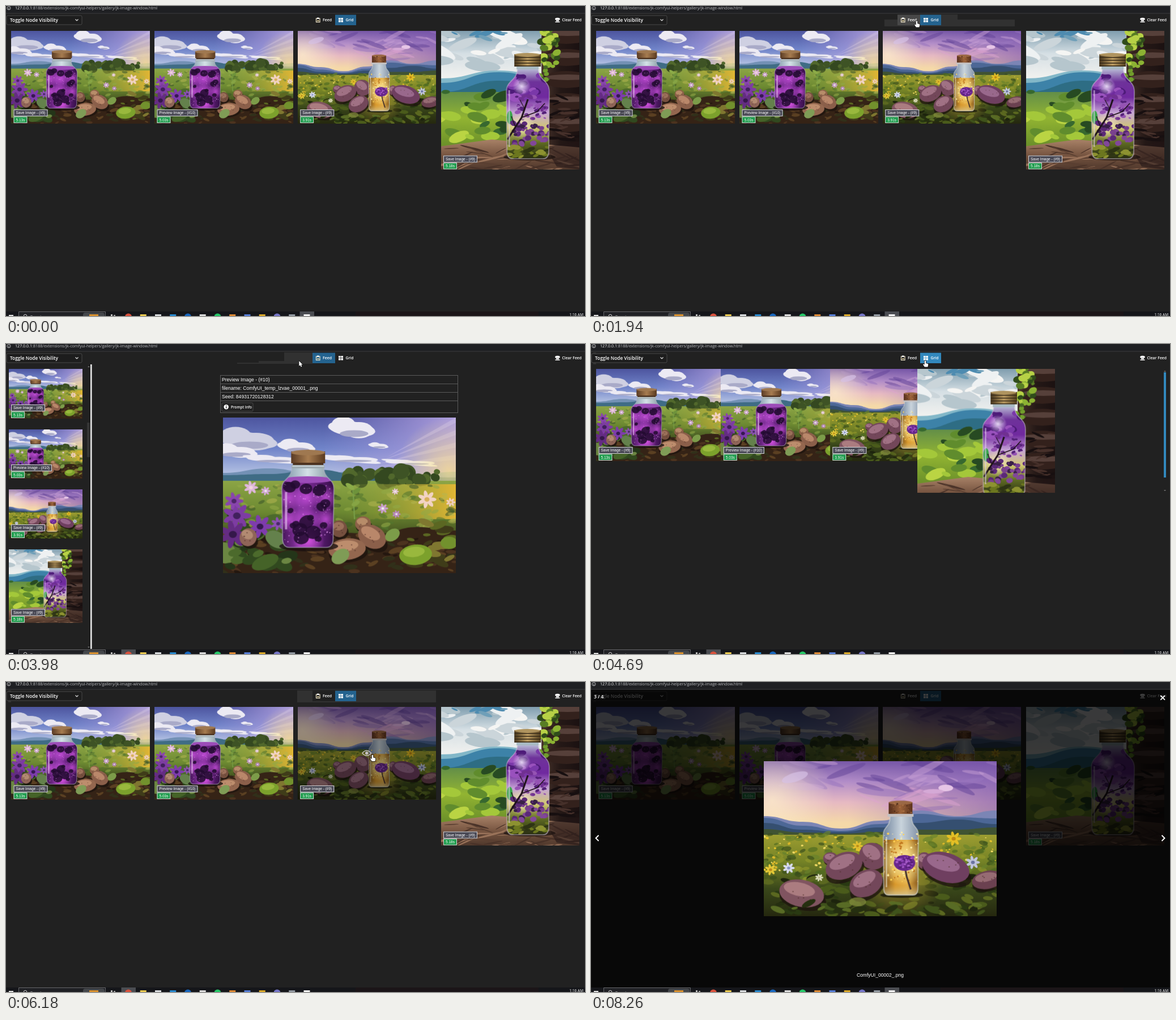
Recreate the animation shown at these times as an HTML page with a canvas. Size 1022x548 px, loop 8.35 s.

```html
<!DOCTYPE html>
<html lang="en">
<head>
<meta charset="utf-8">
<title>Image gallery</title>
<style>
html, body { margin: 0; width: 100%; height: 100%; overflow: hidden; background: #212121; }
canvas { display: block; }
</style>
</head>
<body>
<canvas id="stage" width="1022" height="548"></canvas>
<script>
const LOOP = 8350;
const screen2d = document.getElementById('stage').getContext('2d');
let c = screen2d;
const SANS = '"Open Sans", sans-serif', ARIAL = '"Liberation Sans", Arial, sans-serif';
const BG = '#212121', BLUE = '#24638f', BRIGHT = '#3288bd';

// Drawing helpers
const clamp = v => Math.max(0, Math.min(1, v));
const mix = (a, b, k) => a + (b - a) * k;
const easeOut = p => 1 - (1 - clamp(p)) ** 3;

function rect(x, y, w, h, fill) { c.fillStyle = fill; c.fillRect(x, y, w, h); }
function frame(x, y, w, h, color, lw = 1) { c.strokeStyle = color; c.lineWidth = lw; c.strokeRect(x, y, w, h); }
function ell(x, y, rx, ry, fill, rot = 0) {
  c.fillStyle = fill;
  c.beginPath(); c.ellipse(x, y, rx, ry, rot, 0, 7); c.fill();
}
function line(color, lw, ...p) {
  c.strokeStyle = color; c.lineWidth = lw;
  c.beginPath();
  for (let i = 0; i < p.length; i += 2) c.lineTo(p[i], p[i + 1]);
  c.stroke();
}
function poly(fill, ...p) {
  c.fillStyle = fill;
  c.beginPath();
  for (let i = 0; i < p.length; i += 2) c.lineTo(p[i], p[i + 1]);
  c.fill();
}
function text(s, x, y, size, color = '#fff', font = SANS, weight = 400, align = 'left') {
  c.font = `${weight} ${size}px ${font}`;
  c.fillStyle = color; c.textAlign = align; c.textBaseline = 'alphabetic';
  c.fillText(s, x, y);
  return c.measureText(s).width;
}
function grad(x0, y0, x1, y1, ...colors) {
  const g = c.createLinearGradient(x0, y0, x1, y1);
  colors.forEach((col, i) => g.addColorStop(i / (colors.length - 1), col));
  return g;
}
function glow(x, y, r, color) {
  const g = c.createRadialGradient(x, y, 0, x, y, r);
  g.addColorStop(0, color); g.addColorStop(1, color.slice(0, 7) + '00');
  ell(x, y, r, r, g);
}

let seed = 1;
const rnd = () => (seed = seed * 16807 % 2147483647) / 2147483647;
function scatter(n, x, y, w, h, rx, ry, ...colors) {
  for (let i = 0; i < n; i++) {
    const k = 0.4 + rnd() * 0.8;
    ell(x + rnd() * w, y + rnd() * h, rx * k, ry * k, colors[i % colors.length], rnd() - 0.5);
  }
}
function hills(fill, base, ...ys) {
  const step = 412 / (ys.length - 1);
  c.fillStyle = fill;
  c.beginPath(); c.moveTo(0, base); c.lineTo(0, ys[0]);
  for (let i = 1; i < ys.length; i++) {
    const x = i * step, m = x - step / 2;
    c.bezierCurveTo(m, ys[i - 1], m, ys[i], x, ys[i]);
  }
  c.lineTo(412, base); c.fill();
}
function cloud(x, y, w, h, color = '#eceaf3') {
  ell(x, y, w, h * 0.55, color, 0.12);
  ell(x - w * 0.35, y - h * 0.3, w * 0.5, h * 0.6, color);
  ell(x + w * 0.3, y + h * 0.1, w * 0.6, h * 0.6, color);
  ell(x + w * 0.1, y + h * 0.35, w * 0.6, h * 0.25, '#a9aac8');
}
function flower(x, y, r, color, eye) {
  for (let a = 0; a < 6.2; a += 0.9)
    ell(x + Math.cos(a) * r * 0.55, y + Math.sin(a) * r * 0.5, r * 0.5, r * 0.22, color, a);
  ell(x, y, r * 0.28, r * 0.25, eye);
}
function potato(x, y, rx, ry, rot, body, light) {
  ell(x + 2, y + ry * 0.4, rx * 1.05, ry * 0.85, '#1d130ecc', rot);
  ell(x, y, rx, ry, body, rot);
  ell(x - rx * 0.1, y - ry * 0.3, rx * 0.7, ry * 0.5, light, rot);
  for (let i = 0; i < 5; i++) ell(x + (rnd() - 0.5) * rx, y + (rnd() - 0.5) * ry, 1.3, 1, '#4a2a2599');
}
// Symmetric glass outline: neck half-width, body half-width and heights
function glass(cx, neck, body, top, shoulder, bottom) {
  const r = body * 0.3, p = new Path2D();
  p.moveTo(cx - neck, top);
  p.bezierCurveTo(cx - neck, mix(top, shoulder, 0.6), cx - body, mix(top, shoulder, 0.5), cx - body, shoulder);
  p.lineTo(cx - body * 0.97, bottom - r);
  p.quadraticCurveTo(cx - body * 0.95, bottom, cx - body + r, bottom);
  p.lineTo(cx + body - r, bottom);
  p.quadraticCurveTo(cx + body * 0.95, bottom, cx + body * 0.97, bottom - r);
  p.lineTo(cx + body, shoulder);
  p.bezierCurveTo(cx + body, mix(top, shoulder, 0.5), cx + neck, mix(top, shoulder, 0.6), cx + neck, top);
  return p;
}
function inside(path, draw) { c.save(); c.clip(path); draw(); c.restore(); }
function outline(path, color, lw) { c.strokeStyle = color; c.lineWidth = lw; c.stroke(path); }

// Pictures
function picture(w, h, draw) {
  const cv = document.createElement('canvas');
  cv.width = w; cv.height = h;
  c = cv.getContext('2d');
  seed = 77;
  draw();
  c = screen2d;
  return cv;
}

const jarPic = picture(412, 275, () => {
  rect(0, 0, 412, 120, grad(0, 0, 0, 110, '#4d559f', '#7084c9', '#c3cfe8'));
  rect(180, 0, 232, 120, grad(180, 0, 412, 20, '#a090d800', '#b0a0de'));
  for (let i = 0; i < 4; i++) poly('#d0c4ec66', 412, i * 22, 412, i * 22 + 9, 290 - i * 8, 70 + i * 6);
  cloud(228, 20, 42, 24); cloud(42, 40, 55, 26, '#cfd0e2'); cloud(20, 60, 42, 16); cloud(130, 52, 34, 16);
  cloud(275, 50, 18, 7); cloud(85, 74, 50, 9); cloud(225, 74, 55, 8); cloud(330, 80, 50, 6);
  hills('#7391b5', 140, 98, 90, 100, 94, 104, 96);
  hills('#3f6c85', 140, 102, 100, 92, 102, 104, 106);
  glow(400, 95, 95, '#ffe48ac0');
  rect(0, 112, 412, 165, grad(0, 112, 0, 220, '#8ca545', '#6d8a32', '#38431a'));
  scatter(45, 220, 94, 160, 22, 13, 11, '#3e5325', '#51682c', '#344820');
  rect(215, 118, 197, 62, grad(215, 0, 412, 0, '#93a43a00', '#e0b534'));
  scatter(170, 0, 120, 412, 80, 9, 4, '#54762f99', '#91a94699', '#3d592a99', '#b4b55188');
  hills('#352316', 275, 212, 208, 215, 204, 206, 194, 200);
  scatter(120, 0, 208, 412, 67, 11, 4, '#24170f', '#4c331f', '#5b4022', '#31301a');
  scatter(32, 0, 170, 125, 100, 16, 9, '#4c6a2c', '#31491f', '#6b8642', '#243519');
  scatter(20, 310, 185, 100, 80, 15, 6, '#5b6722', '#7f7730', '#3f3c19');

  line('#79a04a', 2, 233, 180, 230, 120);
  ell(225, 122, 9, 4, '#8cac48', 0.6); ell(237, 130, 8, 4, '#6e933b', -0.7); ell(235, 152, 8, 4, '#86a444', -0.5);
  flower(25, 174, 24, '#7d3ca2', '#41205d'); flower(66, 193, 21, '#7e3cad', '#351850');
  flower(20, 148, 16, '#8945ad', '#4d2567'); flower(18, 207, 25, '#642c83', '#35184a');
  flower(98, 188, 12, '#8d50b5', '#4a2968');
  flower(50, 124, 12, '#dfb7dc', '#f0d6dc'); flower(76, 130, 8, '#d5a9d9', '#eee');
  flower(361, 145, 16, '#f2d3c3', '#d7b05b'); flower(403, 150, 8, '#f0cfc0', '#dbb258');
  flower(283, 161, 9, '#caa0cf', '#eee'); flower(307, 171, 7, '#ba87c5', '#eee'); flower(305, 131, 6, '#e8c7d8', '#eee');

  potato(45, 212, 15, 16, 0.4, '#8f6558', '#b28a72');
  potato(206, 197, 14, 15, 0, '#76503f', '#9b705a');
  potato(248, 188, 14, 13, 0, '#8d6149', '#b78c69');
  potato(264, 211, 26, 20, 0.5, '#8b5f4a', '#b9876a');
  potato(220, 233, 33, 19, -0.1, '#94674f', '#bd8d6d');
  ell(95, 216, 21, 14, '#64814c', 0.5); ell(75, 256, 25, 12, '#456328', -0.4);
  ell(208, 246, 17, 12, '#7f9c56', -0.6); ell(300, 208, 14, 10, '#7c9c49', -0.6);
  ell(341, 243, 29, 18, '#7ca12c', -0.1); ell(338, 238, 19, 9, '#99b83d', -0.1);
  ell(400, 222, 15, 11, '#72912d');

  const jar = glass(150.5, 28, 46, 87, 126, 230);
  ell(152, 228, 52, 9, '#170e0ecc');
  inside(jar, () => {
    rect(100, 85, 100, 150, grad(105, 0, 195, 0, '#7790a3', '#d4e1e7', '#7d929a'));
    rect(100, 108, 100, 125, grad(105, 0, 195, 0, '#451558', '#8a35a4', '#64217c', '#370f4a'));
    ell(150, 110, 45, 6, '#9c4cb8');
    for (let i = 0; i < 6; i++) glow(116 + i % 3 * 33, 142 + (i % 2) * 38, 23, '#d454e8c0');
    glow(152, 218, 28, '#e65af0d0');
    scatter(16, 112, 118, 76, 100, 12, 10, '#220b30dd');
    scatter(85, 107, 118, 86, 108, 1, 1, '#f3a8ffaa');
    line('#e8c7f299', 4, 112, 132, 112, 198);
  });
  outline(jar, '#b5b2c5aa', 1.6);
  rect(122, 84, 58, 6, '#9eaab0');
  rect(121, 60, 60, 21, grad(121, 0, 181, 0, '#5a3b24', '#a77c50', '#59391f'));
  ell(151, 62, 30, 5, '#9f7850');
  rect(124, 80, 54, 4, '#4c321f'); line('#d5dfe5', 1.5, 123, 86, 179, 86);
});

const bottlePic = picture(412, 275, () => {
  rect(0, 0, 412, 130, grad(0, 0, 0, 110, '#7657a6', '#b28dc8', '#e6b9c2', '#f5d9a8'));
  rect(150, 0, 262, 130, grad(150, 0, 412, 0, '#7552aa00', '#7753aa99'));
  scatter(28, 60, 0, 352, 58, 38, 6, '#65469b88', '#9874bd88', '#c49cd388');
  glow(15, 70, 110, '#fff1cabb');
  scatter(8, 150, 60, 260, 30, 50, 5, '#dca4cf77', '#8f6cb577');
  ell(322, 48, 13, 6, '#e6c5e6'); ell(300, 54, 18, 4, '#d5a9d6'); ell(55, 29, 24, 8, '#d9c4e7aa', -0.3);
  hills('#7b85b5', 145, 98, 108, 120, 106, 88, 98, 88);
  hills('#4c6796', 145, 101, 115, 124, 112, 94, 100, 102);
  hills('#354f70', 145, 110, 122, 126, 118, 110, 104, 112);
  hills('#405332', 150, 121, 127, 129, 126, 122, 122, 118);
  rect(0, 131, 412, 144, grad(0, 131, 0, 275, '#9d9d31', '#748226', '#39471a', '#25280f'));
  scatter(230, 0, 128, 412, 85, 8, 4, '#4e6a21aa', '#92982caa', '#69832caa', '#374d1baa');
  scatter(85, 0, 134, 412, 60, 2.5, 1.8, '#e6c52e', '#f0d963', '#d9b629');
  scatter(110, 0, 205, 412, 70, 12, 5, '#293912', '#4a5b1b', '#1d240d', '#5b6820');
  glow(240, 205, 80, '#d9ae3890');
  flower(336, 138, 13, '#e5bf25', '#c08a15'); flower(166, 151, 9, '#e2bf31', '#bd8f18');
  flower(12, 193, 10, '#e5c937', '#b98b1c');
  flower(44, 190, 10, '#d9dcf0', '#8795c4'); flower(370, 180, 12, '#c1c5de', '#6973a0');
  flower(98, 207, 7, '#dfdfbf', '#bbb884');

  const skin = '#73475a', shine = '#a07184';
  potato(118, 173, 13, 11, 0, skin, shine);
  potato(193, 169, 25, 23, 0.6, skin, shine);
  potato(284, 177, 13, 15, 0, skin, shine);
  potato(142, 186, 34, 23, -0.4, skin, shine);
  potato(322, 189, 43, 26, 0.3, '#6f3f60', '#99688c');
  potato(396, 211, 28, 16, -0.2, '#6b4150', '#966b73');
  potato(181, 217, 31, 23, -0.5, skin, shine);
  potato(67, 235, 40, 24, 0.2, '#805460', '#ab7c80');
  scatter(28, 20, 250, 380, 20, 13, 5, '#3f521b', '#252f10', '#586b25');
  ell(166, 250, 15, 8, '#8b9541aa');

  const bottle = glass(242.5, 19, 31, 99, 132, 238);
  ell(244, 238, 38, 5, '#191a0ccc');
  inside(bottle, () => {
    rect(205, 95, 76, 145, grad(212, 0, 274, 0, '#7386a0', '#c9d4dc', '#8393a8'));
    rect(205, 140, 76, 100, grad(212, 0, 274, 0, '#74501c', '#d9982b', '#e3ac43', '#85571b'));
    glow(246, 178, 43, '#fff3a6ff');
    scatter(110, 211, 127, 63, 88, 1.6, 1.6, '#fff0a8', '#ffd251', '#c2791f');
    rect(205, 218, 76, 20, grad(0, 218, 0, 238, '#cba04a00', '#d5cda3bb'));
    line('#f4f0dd99', 2.5, 217, 135, 217, 224);
  });
  line('#41302c', 3, 250, 190, 253, 206, 260, 228);
  ell(249, 181, 19, 14, '#69278e');
  scatter(55, 232, 169, 33, 21, 2.4, 2, '#8d42b5', '#582079', '#a85cc9');
  outline(bottle, '#d1d4cfaa', 1.8);
  rect(221, 73, 42, 22, grad(221, 0, 263, 0, '#532d1b', '#9c633a', '#5b321c'));
  ell(242, 74, 21, 3.5, '#9b6844');
  scatter(25, 223, 75, 38, 17, 1.3, 1, '#482716', '#b77b4a');
  rect(219, 94, 46, 5, '#c4c1c2');
});

const treePic = picture(245, 245, () => {
  rect(0, 0, 245, 90, grad(0, 0, 0, 80, '#7f9dae', '#d5dfe4', '#eff0ee'));
  scatter(28, -10, 5, 200, 60, 27, 8, '#eef1f2', '#cbd5da', '#b6c6cd', '#f5f5f3');
  scatter(7, 0, 0, 170, 18, 15, 4, '#4d8bb0', '#6f9fb8');
  hills('#82b7c8', 140, 84, 70, 86, 90, 90);
  hills('#3d82a8', 140, 92, 73, 92, 98, 88);
  hills('#2e6d84', 150, 108, 88, 102, 100, 100);
  rect(0, 108, 195, 100, grad(0, 108, 0, 200, '#638e48', '#92b432', '#6d922a'));
  scatter(42, -5, 107, 195, 86, 17, 8, '#37682f', '#a4c83a', '#274a22', '#bad443', '#608c2d');
  rect(178, 0, 67, 245, grad(178, 0, 245, 0, '#49342c', '#241816', '#1b1111'));
  for (let y = 8; y < 190; y += 39) { ell(222, y, 43, 15, '#33211c'); ell(224, y - 4, 39, 5, '#56403a'); }
  scatter(25, 185, 115, 60, 80, 14, 2.5, '#46302a', '#170f10');
  scatter(32, 176, -2, 30, 65, 8, 6, '#587d24', '#8cb333', '#304c1b', '#b7d146');
  scatter(12, 174, 55, 24, 40, 6, 5, '#729e2c', '#476724');
  poly(grad(0, 195, 0, 245, '#a37d63', '#765440', '#4f382c'), 0, 204, 90, 192, 245, 206, 245, 245, 0, 245);
  scatter(50, 0, 207, 245, 38, 25, 1.7, '#5a3f31', '#9a735a', '#493228');
  poly('#24171799', 185, 205, 245, 195, 245, 245, 205, 240);

  const bottle = glass(154, 18, 38, 63, 108, 226);
  ell(157, 223, 46, 6, '#1c1210bb');
  inside(bottle, () => {
    rect(112, 60, 84, 168, grad(0, 63, 0, 226, '#c4d2df', '#6e329a', '#70299f', '#c6a4d5', '#d0c772', '#5c6822', '#282c13'));
    scatter(28, 120, 78, 70, 42, 10, 6, '#4e1b79', '#7a38a9', '#9951bd');
    glow(143, 98, 16, '#f5edffdd');
    scatter(45, 133, 115, 52, 42, 5, 3, '#703091', '#9553b3', '#542179');
    glow(143, 168, 24, '#fff6c8cc');
    ell(122, 153, 5, 12, '#38a548');
    scatter(55, 128, 163, 65, 42, 5, 4, '#5a2977', '#814799', '#392047', '#79418d');
    scatter(22, 117, 205, 75, 18, 9, 4, '#6c771f', '#2e3414', '#8d9231');
    line('#1d1118', 3, 118, 192, 132, 170, 143, 153, 154, 121);
    line('#1d1118', 1.5, 132, 170, 125, 151);
    line('#1d1118', 1.5, 143, 153, 170, 143, 184, 128);
    line('#1d1118', 1.2, 149, 139, 140, 122);
    line('#e6d5f299', 2.5, 121, 105, 121, 205);
  });
  outline(bottle, '#c9bed299', 1.6);
  rect(134, 62, 39, 6, '#a8bac3');
  rect(130, 41, 47, 22, grad(130, 0, 177, 0, '#46351c', '#c0a064', '#54401f'));
  ell(153, 42, 23, 3, '#af945f');
  for (let y = 47; y < 63; y += 5) line('#342817', 1.5, 130, y, 177, y);
});

const items = [
  { pic: jarPic, name: 'Save Image - (#9)', time: '5.13s', gridX: 9, gridH: 163.5, feedY: 44, feedH: 87.5 },
  { pic: jarPic, name: 'Preview Image - (#10)', time: '5.03s', gridX: 262, gridH: 163.5, feedY: 150.5, feedH: 87 },
  { pic: bottlePic, name: 'Save Image - (#9)', time: '3.91s', gridX: 514.7, gridH: 163.5, feedY: 256.5, feedH: 87 },
  { pic: treePic, name: 'Save Image - (#9)', time: '5.18s', gridX: 767.5, gridH: 245, feedY: 362.5, feedH: 130.5 }
];

// Pointer: time, x, y
const path = [
  [370, 961, 543], [450, 925, 510], [600, 877, 453], [830, 877, 453], [920, 842, 473],
  [1150, 762, 330], [1330, 716, 200], [1480, 662, 95], [1620, 638, 36], [1700, 632, 31],
  [1940, 575, 26], [2650, 575, 26], [2850, 400, 70], [3190, 49, 196], [3570, 53, 196],
  [3760, 270, 110], [3980, 517, 30], [4220, 590, 29], [5310, 590, 29], [5480, 582, 84],
  [5700, 604, 112], [6090, 647, 128.5], [6770, 647, 128.5], [6940, 733, 113],
  [7240, 734, 113], [7400, 790, 79], [7620, 905, 240], [7880, 1019, 550]
];
function pointerAt(t) {
  const i = path.findIndex(k => k[0] > t);
  if (i < 1) return null;
  const [a, b] = [path[i - 1], path[i]], k = (t - a[0]) / (b[0] - a[0]);
  return { x: mix(a[1], b[1], k), y: mix(a[2], b[2], k) };
}
const over = (p, x, y, w, h) => !!p && p.x >= x && p.x < x + w && p.y >= y && p.y < y + h;

function drawPointer(p, hand) {
  c.save();
  c.translate(p.x, p.y);
  c.lineJoin = 'round';
  const shape = new Path2D(hand
    ? 'M-1.3 1Q0-.5 1.2 1V5L4.7 6Q5.5 6.4 5.2 8L4.4 11.5H-1.2L-4 7.2Q-3.6 5.8-1.3 7.5Z'
    : 'M0 0V9L2 7.2 3.4 10.4 5 9.7 3.6 6.6H6.3Z');
  outline(shape, '#111', 1.4);
  c.fillStyle = '#fff'; c.fill(shape);
  c.restore();
}

// Interface
function tag(s, x, y, h, bg) {
  c.font = `6.5px ${ARIAL}`;
  const w = c.measureText(s).width + 8;
  rect(x, y, w, h, bg);
  frame(x + 0.5, y + 0.5, w - 1, h - 1, '#d5d5d8');
  text(s, x + 4, y + h / 2 + 2.4, 6.5, '#fff', ARIAL);
}
function card(item, x, y, w, h) {
  c.drawImage(item.pic, x, y, w, h);
  tag(item.name, x + 4.5, y + h - 24.5, 12, '#484854');
  tag(item.time, x + 4.5, y + h - 12, 11.5, '#1d9c4c');
}
function eye(x, y) {
  c.strokeStyle = '#c4bfc2'; c.lineWidth = 1.3;
  c.beginPath();
  c.moveTo(x - 8, y); c.quadraticCurveTo(x, y - 9, x + 8, y); c.quadraticCurveTo(x, y + 9, x - 8, y);
  c.stroke();
  ell(x, y, 2.7, 2.7, '#c4bfc2');
}
function arrows(x, top, bottom) {
  poly('#777', x - 2, top + 1, x, top - 1, x + 2, top + 1);
  poly('#777', x - 2, bottom - 1, x, bottom + 1, x + 2, bottom - 1);
}

function drawHeader(grid, p) {
  const onFeed = over(p, 541, 15, 40, 19), onGrid = over(p, 581, 15, 37, 19);
  c.beginPath(); c.roundRect(1, 17, 133, 16, 2);
  c.fillStyle = '#1d1d1d'; c.fill();
  c.strokeStyle = '#484848'; c.lineWidth = 1; c.stroke();
  text('Toggle Node Visibility', 7, 28, 8.3, '#fff', SANS, 600);
  line('#ddd', 1.2, 122.5, 23.5, 125, 26, 127.5, 23.5);

  rect(541, 15.5, 40, 18.5, grid ? (onFeed ? '#484848' : BG) : onFeed ? BRIGHT : BLUE);
  rect(581, 15.5, 37, 18.5, grid ? (onGrid ? BRIGHT : BLUE) : onGrid ? '#484848' : BG);
  frame(547.5, 22, 6.5, 6.5, '#f0e6c8', 1.2);
  rect(549, 20.5, 3.5, 2.5, '#fff'); rect(549.3, 25, 3, 2, '#d8c894');
  text('Feed', 559, 27.3, 7, '#fff', SANS, 600);
  for (let i = 0; i < 4; i++) rect(587 + i % 2 * 4.4, 21 + (i >> 1) * 4.2, 3.6, 3.4, '#fff');
  text('Grid', 599.5, 27.3, 6.8, '#fff', SANS, 600);
  ell(973.5, 23, 4.3, 2.3, '#fff'); rect(971, 23, 5, 4, '#ddd'); rect(969.5, 27.5, 8, 1.5, '#fff');
  text('Clear Feed', 981.5, 27.3, 6.8, '#fff', SANS, 600);
}

function drawGrid(t, p) {
  const moving = t >= 4480 && t < 4930;
  c.save();
  if (moving) { c.beginPath(); c.rect(0, 36, 1010, 227); c.clip(); }
  items.forEach((item, i) => {
    const k = moving ? easeOut((t - 4479 - 24 * i) / 380) : 1;
    const size = moving ? 0.994 : 1, x = mix(9, item.gridX, k);
    card(item, x, 44, 244.5 * size, item.gridH * size);
    if (t < 6250 && !moving && over(p, item.gridX, 44, 244.5, item.gridH)) {
      rect(item.gridX, 44, 244.5, item.gridH, '#0006');
      eye(item.gridX + 122, 44 + item.gridH / 2);
      tag(item.name, x + 4.5, 19.5 + item.gridH, 12, '#484854');
      tag(item.time, x + 4.5, 32 + item.gridH, 11.5, '#1d9c4c');
    }
  });
  c.restore();
  if (moving) { rect(1011, 50, 4, 186, BRIGHT); arrows(1013, 48, 259); }
}

function drawFeed(t) {
  items.forEach(item => card(item, 4.5, item.feedY, 130.5, item.feedH));
  rect(143, 139, 5, 61, '#343434');
  arrows(146, 40, 536);
  rect(149, 36, 2.6, 503, '#e6e6e6');

  const preview = t >= 3340;
  [55.5, 70.5, 85.5, 100.5, 121.5].forEach(y => line('#5a5a5a', 1, 378.5, y, 798, y));
  line('#5a5a5a', 1, 378.5, 55, 378.5, 122); line('#5a5a5a', 1, 797.5, 55, 797.5, 122);
  const row = (s, y) => text(s, 381, y, 8.6, '#fff', ARIAL);
  row(items[+preview].name, 66);
  row('filename: ' + (preview ? 'ComfyUI_temp_lzvae_00001_.png' : 'ComfyUI_00003_.png'), 81);
  row('Seed: 84931720128312', 96);
  c.beginPath(); c.roundRect(381, 104, 55, 15, 2);
  c.strokeStyle = '#484848'; c.lineWidth = 1; c.stroke();
  ell(388.7, 111.3, 4.2, 4.2, '#fff');
  rect(388, 110.7, 1.4, 3, BG); rect(388, 108.5, 1.4, 1.3, BG);
  text('Prompt Info', 397, 113.8, 6.4, '#fff', SANS, 600);
  c.drawImage(jarPic, 382.5, 130, 411.5, 274.5);
}

function drawLightbox(t) {
  const k = easeOut((t - 6250) / 350), item = items[2];
  rect(0, 13.5, 1022, 526.5, `rgba(0,0,0,${0.76 * k})`);
  c.drawImage(item.pic, mix(item.gridX, 305, k), mix(44, 139.5, k), mix(244.5, 411, k), mix(item.gridH, 274, k));
  c.globalAlpha = k;
  text('3 / 4', 5, 28.8, 8.4, '#fff', SANS, 600);
  line('#fff', 1.8, 1005.3, 24, 1013, 31.7); line('#fff', 1.8, 1013, 24, 1005.3, 31.7);
  line('#fff', 1.9, 13.5, 271, 8.5, 276, 13.5, 281);
  line('#fff', 1.9, 1007.5, 271, 1012.5, 276, 1007.5, 281);
  text('ComfyUI_00002_.png', 510.5, 521, 8.55, '#fff', ARIAL, 400, 'center');
  c.globalAlpha = 1;
}

function drawBrowser() {
  rect(0, 0, 1022, 13, '#1f2023');
  rect(0, 12.5, 1022, 1, '#3c3c3f');
  c.strokeStyle = '#c9c9cb'; c.lineWidth = 0.9;
  c.beginPath(); c.arc(5, 3.7, 3, 0, 7); c.stroke();
  rect(4.5, 3.2, 1, 2.3, '#ccc');
  const w = text('127.0.0.1', 16, 6.4, 7.13, '#f2f2f3');
  text(':8188/extensions/jk-comfyui-helpers/gallery/jk-image-window.html', 16 + w, 6.4, 7.13, '#bcbdc0');
}

const appColors = ['#d9513c', '#e8c84f', '#d5d8da', '#2788ce', '#1866bd', '#d9d9d9', '#26c767',
  '#dc8833', '#557cd5', '#d9a728', '#7474c6', '#9198a0', '#f0f0f0'];
function drawTaskbar(t) {
  rect(0, 540, 1022, 8, '#15161a');
  rect(617, 540, 323, 8, '#1b1518');
  rect(t >= 2050 && t < 8260 ? 203.5 : 518.5, 540, 25.5, 8, '#4b4d52');
  rect(5, 546, 8, 2, '#ddd');
  rect(22, 540, 154, 8, '#202125');
  line('#66676b', 1, 22.5, 548, 22.5, 540.5, 175.5, 540.5, 175.5, 548);
  c.beginPath(); c.arc(34, 548, 2.8, 0, 7); c.strokeStyle = '#ccc'; c.lineWidth = 1; c.stroke();
  text('Type here', 43, 551.5, 7, '#b5b5b8');
  c.beginPath(); c.roundRect(136, 542, 38, 10, 4); c.fillStyle = '#44474b'; c.fill();
  rect(147, 545, 16, 3, '#d8902e');
  rect(185, 545, 3, 3, '#bbb'); rect(190, 546, 3, 2, '#999');
  appColors.forEach((color, i) => {
    const x = 216 + i * 26.25;
    if ([0, 4, 6, 10].includes(i)) ell(x, 549.5, 6, 6, color);
    else rect(x - 5.5, 545, 11, 3, color);
  });
  text('1:16 AM', 1019, 547.5, 6.5, '#fff', SANS, 400, 'right');
}

// Faint lighter bands behind the toolbar
function drawBands(t) {
  const band = (from, to, x, y, w, h) => { if (t >= from && t < to) rect(x, y, w, h, '#313131'); };
  band(1780, 2110, 518, 24, 230, 12);
  band(1860, 2110, 541, 15, 106, 9);
  band(3900, 4220, 491, 15, 50, 20);
  band(3900, 4220, 446, 30, 45, 5);
  band(3900, 4220, 408, 33, 38, 2);
  band(5400, 6250, 514, 15, 245, 21);
  band(4480, LOOP, 4, 15, 5, 21);
}

function draw(t) {
  const p = pointerAt(t), grid = t < 2110 || t >= 4480, lightbox = t >= 6250;
  rect(0, 0, 1022, 548, BG);
  drawBands(t);
  drawHeader(grid, lightbox ? null : p);
  if (grid) drawGrid(t, p); else drawFeed(t);
  if (lightbox) drawLightbox(t);
  drawBrowser();
  drawTaskbar(t);
  if (p) {
    const onItem = items.some(i => grid ? over(p, i.gridX, 44, 244.5, i.gridH) : over(p, 4.5, i.feedY, 130.5, i.feedH));
    drawPointer(p, !lightbox && (onItem || over(p, 541, 15, 77, 19)));
  }
}

c.imageSmoothingQuality = 'high';
const start = performance.now();
function tick() {
  draw((performance.now() - start) % LOOP);
  requestAnimationFrame(tick);
}
tick();
</script>
</body>
</html>
```
